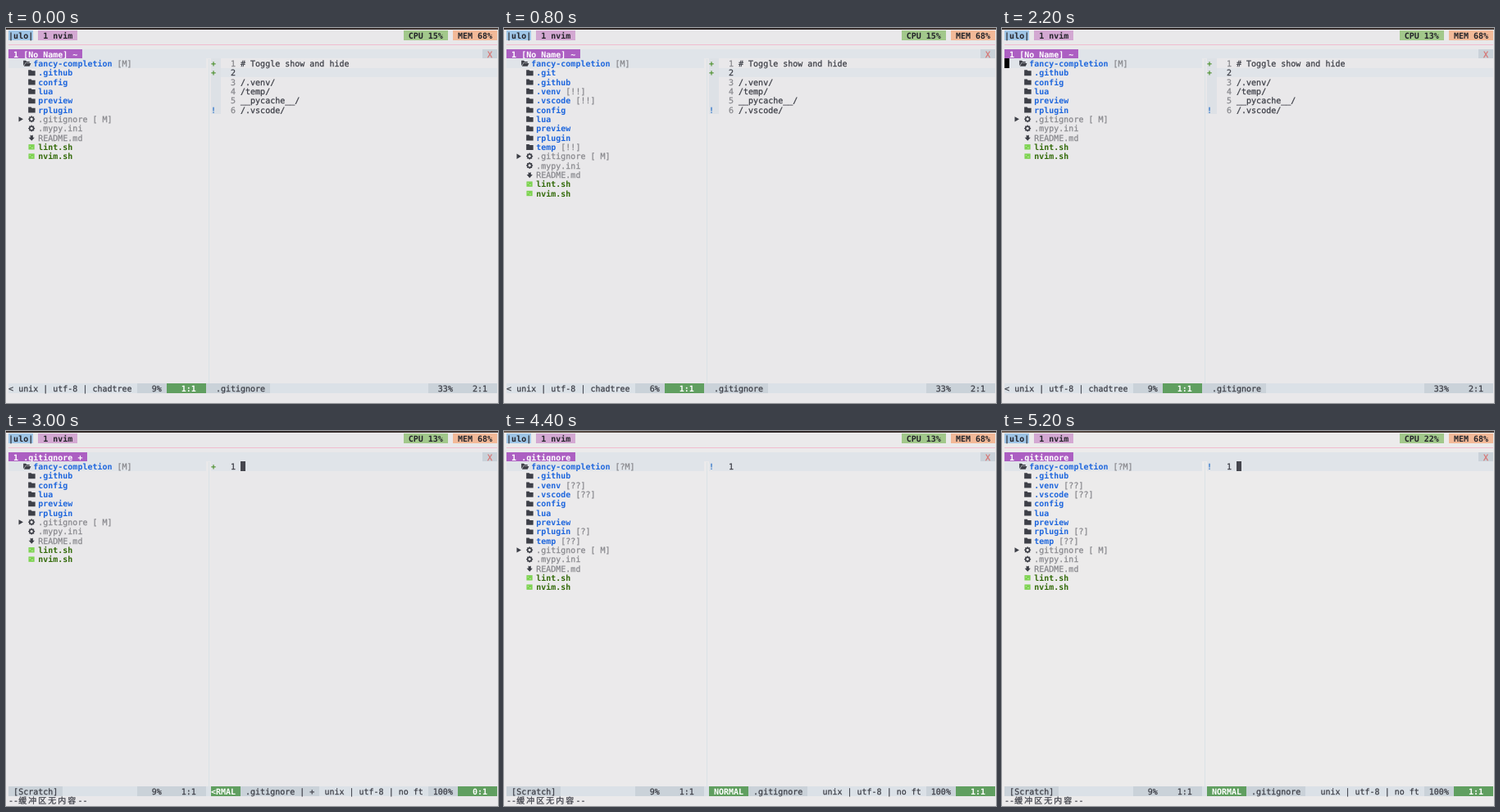
Animation, 600 px wide and 458 px high, one loop 5300 ms. Source, as an HTML page with a canvas:

```html
<!DOCTYPE html>
<html lang="en">
<head>
<meta charset="utf-8">
<title>Terminal file tree</title>
<style>
  html, body { margin: 0; width: 100%; height: 100%; overflow: hidden; background: #e9e8ea; }
  canvas { display: block; }
</style>
</head>
<body>
<canvas width="600" height="458"></canvas>
<script>
const LOOP = 5300, CELL_W = 6.02, ROW_H = 11.34, LEFT = 3.1, TOP = 3.4;
const DARK = '#3d3f47', INK = '#232329', GRAY = '#88888d', BLUE = '#1f67dd', LEAF = '#346b0b';
const LINE = '#e0e4e9', BAR = '#dbe1e7', CHIP = '#cad2d9', GREEN = '#609f60', WHITE = '#fff';
const ctx = document.querySelector('canvas').getContext('2d');
ctx.textRendering = 'geometricPrecision';

const colX = col => LEFT + col * CELL_W;
const rowY = row => TOP + row * ROW_H;

function fill(row, from, to, color) {
  const y = Math.round(rowY(row)), x = Math.round(colX(from));
  ctx.fillStyle = color;
  ctx.fillRect(x, y, Math.round(colX(to)) - x, Math.round(rowY(row + 1)) - y);
}

function text(row, col, str, color = DARK, bold = false) {
  const x = colX(col), y = rowY(row) + 9.5;
  ctx.font = `${bold ? 'bold ' : ''}10px "DejaVu Sans Mono", "Noto Sans CJK SC", monospace`;
  ctx.fillStyle = ctx.strokeStyle = color;
  ctx.fillText(str, x, y);
  if (bold) return;
  // A hairline outline gives the regular face a medium weight.
  ctx.lineWidth = .25;
  ctx.strokeText(str, x, y);
}

function chip(row, from, to, col, str, bg = CHIP, color = DARK, bold = false) {
  fill(row, from, to, bg);
  text(row, col, str, color, bold);
}

// Value of the last [time, value] step that has started.
const at = (t, steps) => steps.filter(([start]) => t >= start).pop()[1];

const shapes = {
  folder: 'M0 1h3.4l1 1.2H8.5V8H0z',
  open: 'M0 1h3l1 1.2h3.6V3.6H2.3L.9 6.6H0zM2.7 4.3H9.3L7.6 8H.8z',
  readme: 'M2.5 1l1 .8h1.2l1-.8v3.2h2L4.1 8.3.5 4.2h2z',
  shell: 'M.3 1.2h7.2v6.4H.3z'
};
for (const key in shapes) shapes[key] = new Path2D(shapes[key]);

function icon(row, col, kind) {
  ctx.save();
  ctx.translate(colX(col), rowY(row) + 1.4);
  ctx.fillStyle = ctx.strokeStyle = kind === 'shell' ? '#7ed352' : DARK;
  if (kind === 'gear') {
    ctx.lineWidth = 1.7;
    ctx.beginPath();
    ctx.arc(4, 4.4, 2.5, 0, 7);
    ctx.stroke();
    for (let i = 0; i < 8; i++) {
      const a = i * Math.PI / 4;
      ctx.fillRect(3.4 + 3.4 * Math.cos(a), 3.8 + 3.4 * Math.sin(a), 1.2, 1.2);
    }
  } else {
    ctx.fill(shapes[kind]);
    if (kind === 'shell') {
      ctx.fillStyle = '#c8efb0';
      ctx.fillRect(1.6, 3, 1.2, 1);
      ctx.fillRect(3.8, 5, 2, .8);
    }
  }
  ctx.restore();
}

const plain = '.github,config,lua,preview,rplugin';
const hidden = '.git,.github,.venv [!!],.vscode [!!],config,lua,preview,rplugin,temp [!!]';
const untracked = '.github,.venv [??],.vscode [??],config,lua,preview,rplugin [?],temp [??]';
const files = [
  ['.gitignore [ M]', 'gear', GRAY], ['.mypy.ini', 'gear', GRAY], ['README.md', 'readme', GRAY],
  ['lint.sh', 'shell', LEAF], ['nvim.sh', 'shell', LEAF]
];
const lines = ['# Toggle show and hide', '', '/.venv/', '/temp/', '__pycache__/', '/.vscode/'];

function label(row, col, str, color, bold) {
  const [name, ...mark] = str.split(' ');
  text(row, col, name, color, bold);
  if (mark.length) text(row, col + name.length + 1, mark.join(' '), GRAY);
}

function drawTree(t) {
  icon(3, 3, 'open');
  label(3, 5, 'fancy-completion ' + (t < 4400 ? '[M]' : '[?M]'), BLUE, true);
  let row = 4;
  for (const dir of at(t, [[0, plain], [400, hidden], [1800, plain], [4400, untracked]]).split(',')) {
    icon(row, 4, 'folder');
    label(row++, 6, dir, BLUE, true);
  }
  const y = rowY(row) + 5.9;
  ctx.fillStyle = DARK;
  ctx.beginPath();
  ctx.moveTo(15.5, y - 3.2);
  ctx.lineTo(21, y);
  ctx.lineTo(15.5, y + 3.2);
  ctx.fill();
  for (const [name, kind, color] of files) {
    icon(row, 4, kind);
    label(row++, 6, name, color, color === LEAF);
  }
}

function drawEditor(t, cleared) {
  const sign = (row, mark) => text(row, 41, mark, mark === '+' ? '#4f9130' : '#2f74c8', true);
  if (cleared) {
    fill(3, 41, 99, LINE);
    sign(3, t < 3300 ? '+' : '!');
    text(3, 45, '1');
    return;
  }
  fill(4, 41, 99, LINE);
  lines.forEach((line, i) => {
    fill(3 + i, 41, 43, '#dde1e6');
    text(3 + i, 45, String(i + 1), i === 1 ? DARK : GRAY);
    text(3 + i, 47, line);
  });
  sign(3, '+');
  sign(4, '+');
  sign(8, '!');
}

function drawStatus(t, cleared, saved) {
  fill(38, 0, 99, BAR);
  const percent = t >= 400 && t < 1800 ? '6%' : '9%';
  if (!cleared) {
    text(38, 0, '< unix | utf-8 | chadtree');
    chip(38, 26, 32, 29, percent);
    chip(38, 32, 40, 35, '1:1', GREEN, WHITE, true);
    chip(38, 40, 53, 42, '.gitignore');
    chip(38, 85, 99, 87, '33%');
    text(38, 94, '2:1');
    return;
  }
  chip(38, 0, 11, 1, '[Scratch]');
  chip(38, 26, 40, 29, percent);
  text(38, 35, '1:1');
  if (saved) {
    chip(38, 41, 49, 42, 'NORMAL', GREEN, WHITE, true);
    chip(38, 49, 61, 50, '.gitignore');
  } else {
    chip(38, 41, 47, 41, '<RMAL', GREEN, WHITE, true);
    chip(38, 47, 63, 48, '.gitignore | +');
  }
  text(38, 64, 'unix | utf-8 | no ft');
  chip(38, 85, 91, 86, '100%');
  chip(38, 91, 99, 94, saved ? '1:1' : '0:1', GREEN, WHITE, true);
  text(39, 0, '--');
  [...'缓冲区无内容'].forEach((glyph, i) => text(39, 2 + 2 * i, glyph));
  text(39, 14, '--');
}

function drawBackground(t) {
  const late = Math.max(0, Math.min(1, (t - 4100) / 500));
  ctx.fillStyle = `rgb(${233 + 3 * late},${232 + 3 * late},${234 + late})`;
  ctx.fillRect(0, 0, 600, 458);
  const strip = ctx.createLinearGradient(0, 0, 600, 0);
  strip.addColorStop(0, late ? '#6b5b50' : '#3a302c');
  strip.addColorStop(.5, '#2a2425');
  strip.addColorStop(1, '#4a3d38');
  ctx.fillStyle = strip;
  ctx.fillRect(0, 0, 600, 2);
  ctx.fillStyle = '#f0bccf';
  ctx.fillRect(3, 20, 596, 1);
}

function draw(t) {
  const cleared = t >= 2800, saved = t >= 3600;
  drawBackground(t);

  chip(0, 0, 5, 0, '|ulo|', '#9fc5e6', INK, true);
  chip(0, 6, 14, 7, '1 nvim', '#d3a8d2', INK, true);
  const cpu = at(t, [[0, 15], [1900, 13], [3700, 16], [4400, 13], [5000, 22]]);
  chip(0, 80, 89, 81, `CPU ${cpu}%`, '#a2c88b', INK, true);
  chip(0, 90, 99, 91, 'MEM 68%', '#f2b998', INK, true);

  fill(2, 0, 99, LINE);
  const tab = saved ? '1 .gitignore' : cleared ? '1 .gitignore +' : '1 [No Name] ~';
  chip(2, 0, tab.length + 2, 1, tab, '#ac5fc2', WHITE, true);
  chip(2, 96, 99, 97, 'X', CHIP, '#d8706f');

  ctx.fillStyle = '#dae2e6';
  ctx.fillRect(247, 38, 1, 397);
  fill(3, 0, 40, LINE);
  drawTree(t);
  drawEditor(t, cleared);
  drawStatus(t, cleared, saved);

  if (t >= 2100 && !cleared) fill(3, 0, 1, '#000');
  if (cleared && !saved || t >= 5000) fill(3, 47, 48, '#45464e');
}

function tick() {
  draw(performance.now() % LOOP);
  requestAnimationFrame(tick);
}
tick();
</script>
</body>
</html>
```
